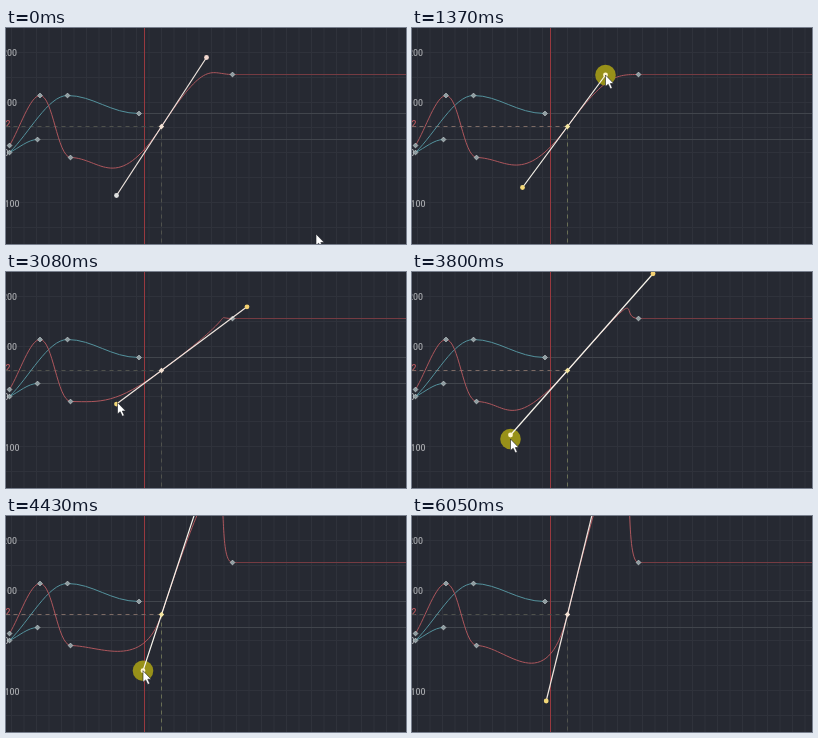
Write an HTML page that moves like this. It is 400 by 216 pixels and loops after 6.66 s.

```html
<!DOCTYPE html>
<html lang="en">
<head>
<meta charset="utf-8">
<title>Curve editor</title>
<style>
  html, body { margin: 0; width: 100%; height: 100%; overflow: hidden; background: #262932; }
  svg { display: block; width: 400px; height: 216px; }
  path, line { fill: none; }
  text { font: 500 8.8px Roboto, Arial, sans-serif; fill: #a2a4a8; text-anchor: middle; }
  .grid { stroke: #2f323b; }
  .rest { stroke: #41454c; }
  .red { stroke: #ad565c; }
  .teal { stroke: #54929d; }
  .key { fill: #8d9ca0; stroke: #c3cbcc; stroke-width: .7; }
  .dash { stroke: #4f514c; stroke-dasharray: 4 4; }
  .handle { stroke: #f0e6df; stroke-width: 1.2; }
  #halo { fill: #989119; }
  #pivot { fill: #f3e2d4; }
  .drag .handle { stroke: #f8f5ec; }
  .drag #dashX { stroke: #7c6a64; }
  .drag #dashY { stroke: #696e55; }
  .drag #pivot { fill: #f4e6a0; }
</style>
</head>
<body>
<svg viewBox="0 0 400 216">
  <rect width="400" height="216" fill="#262932"/>
  <path id="grid" class="grid"/>
  <path class="rest" d="M133 85.5H400M31.5 111.5H400"/>
  <path d="M138.5 0V216" stroke="#98393f"/>
  <g>
    <text x="3.5" y="28">200</text>
    <text x="3.5" y="78">100</text>
    <text x="0" y="128">0</text>
    <text x="4.5" y="178.5">-100</text>
    <text x="2" y="99" style="fill:#b9595f">2</text>
  </g>
  <path id="dashX" class="dash" d="M155.5 98.5H0"/>
  <path id="dashY" class="dash" d="M155.5 98.5V216"/>
  <path class="teal" d="M3.5 124.5C23 105.5 42 67.5 61.5 67.5C87 67.5 105 85.5 133 85.5M3.5 124.5C13 120 22 111.5 31.5 111.5"/>
  <path class="red" d="M3.5 117.5C13.7 100.7 24 67.5 34 67.5C47 67.5 51 128 64.5 129.5"/>
  <path d="M226.5 46.5H400" stroke="#753b42"/>
  <path id="curve" class="red"/>
  <g id="keys"></g>
  <circle id="halo" r="10.3"/>
  <line id="bar" class="handle"/>
  <path id="pivot" d="M155.5 95.8l2.7 2.7l-2.7 2.7l-2.7-2.7z"/>
  <circle id="left" r="2.4"/>
  <circle id="right" r="2.4"/>
  <path id="cursor" d="M0 0V11.5L2.7 9.2L4.8 13.8L6.8 12.9L4.8 8.5H8.2Z" style="fill:#fff;stroke:#1a1c22;stroke-width:.6"/>
</svg>
<script>
const $ = id => document.getElementById(id);
const set = (id, attrs) => { for (const k in attrs) $(id).setAttribute(k, attrs[k]); };

const LOOP = 6660;
const pivot = { x: 155.5, y: 98.5 };

// Each move: start, end, steps, held handle, then stops [progress, x, y, handle lag].
const moves = [
  { from: 70, to: 530, n: 7, stops: [[0, 310, 206], [1, 201, 26.5]] },
  { from: 1140, to: 1680, n: 8, grab: 'right', stops: [[0, 201, 29.5], [.5, 193.5, 47], [1, 196, 44]] },
  { from: 1910, to: 2150, n: 4, grab: 'right', stops: [[0, 196, 44], [1, 241, 34.8]] },
  { from: 2550, to: 3080, n: 8, stops: [[0, 241, 35], [1, 111.5, 130.5]] },
  { from: 3560, to: 4190, n: 9, grab: 'left', stops: [[0, 111, 131.5, 0], [4 / 9, 98.5, 167, 4], [1, 116, 176, 0]] },
  { from: 4280, to: 4660, n: 6, grab: 'left', stops: [[0, 116, 176], [.5, 137, 154.7], [1, 143.5, 155.5]] },
  { from: 4890, to: 5280, n: 6, grab: 'left', stops: [[0, 143.5, 155.5], [1 / 3, 142.5, 159], [1, 134.2, 185]] },
  { from: 5580, to: 6050, n: 7, stops: [[0, 134.2, 185], [1, 403, 214]] }
];
const presses = [[760, 2550], [3390, 5580]];
const drags = [[1140, 2550], [3560, 5580]];
const within = (spans, t) => spans.some(([a, b]) => t >= a && t < b);
const ease = p => p * p * (3 - 2 * p);

function locate({ from, to, n, stops }, t) {
  const step = Math.min(n - 1, Math.floor((t - from) / (to - from) * (n - 1) + .06));
  const p = (step + 1) / n;
  let i = 1;
  while (i < stops.length - 1 && p > stops[i][0] + 1e-6) i++;
  const [a, b] = [stops[i - 1], stops[i]];
  const u = ease((p - a[0]) / (b[0] - a[0]));
  const mix = k => (a[k] || 0) + ((b[k] || 0) - (a[k] || 0)) * u;
  return { x: mix(1), y: mix(2), lag: mix(3) };
}

function stateAt(t) {
  let cursor = { x: 310, y: 206 };
  let lx = -45, rx = 45, slope = -69 / 45;
  for (const m of moves) {
    if (t < m.from) break;
    cursor = locate(m, t);
    if (!m.grab) continue;
    const dx = cursor.x - pivot.x;
    slope = (cursor.y - cursor.lag - pivot.y) / dx;
    if (m.grab === 'right') rx = dx; else lx = dx;
  }
  const end = dx => ({ x: pivot.x + dx, y: pivot.y + dx * slope });
  return { cursor, left: end(lx), right: end(rx) };
}

function draw(t) {
  const { cursor, left, right } = stateAt(t);
  const pressed = within(presses, t);
  document.querySelector('svg').classList.toggle('drag', within(drags, t));
  set('curve', {
    d: `M64.5 129.5C95 130 ${left.x} ${left.y} ${pivot.x} ${pivot.y}` +
       `C${right.x} ${right.y} 204 46.5 226.5 46.5`
  });
  set('bar', { x1: left.x, y1: left.y, x2: right.x, y2: right.y });
  set('left', { cx: left.x, cy: left.y, fill: t < 1140 ? '#dedfdf' : '#f3d878' });
  set('right', { cx: right.x, cy: right.y, fill: t < 1140 ? '#f2d8cf' : '#f3d070' });
  if (pressed) set(t < 2550 ? 'right' : 'left', { fill: '#fff6cf' });
  set('halo', { cx: cursor.x, cy: cursor.y, visibility: pressed ? 'visible' : 'hidden' });
  set('cursor', { transform: `translate(${cursor.x} ${cursor.y})` });
}

let lines = '';
for (let x = 0; x < 32; x++) lines += `M${x * 12.5 + 5.5} 0V216`;
for (let y = 1; y < 9; y++) lines += `M0 ${y * 25 - .5}H400`;
set('grid', { d: lines });

$('keys').innerHTML = [[3.5, 117.5], [3.5, 124.5], [31.5, 111.5], [34, 67.5], [61.5, 67.5], [64.5, 129.5], [133, 85.5], [226.5, 46.5]]
  .map(([x, y]) => `<path class="key" d="M${x} ${y - 2.4}l2.4 2.4l-2.4 2.4l-2.4-2.4z"/>`).join('');

const start = performance.now();
function tick() {
  draw((performance.now() - start) % LOOP);
  requestAnimationFrame(tick);
}
tick();
</script>
</body>
</html>
```
